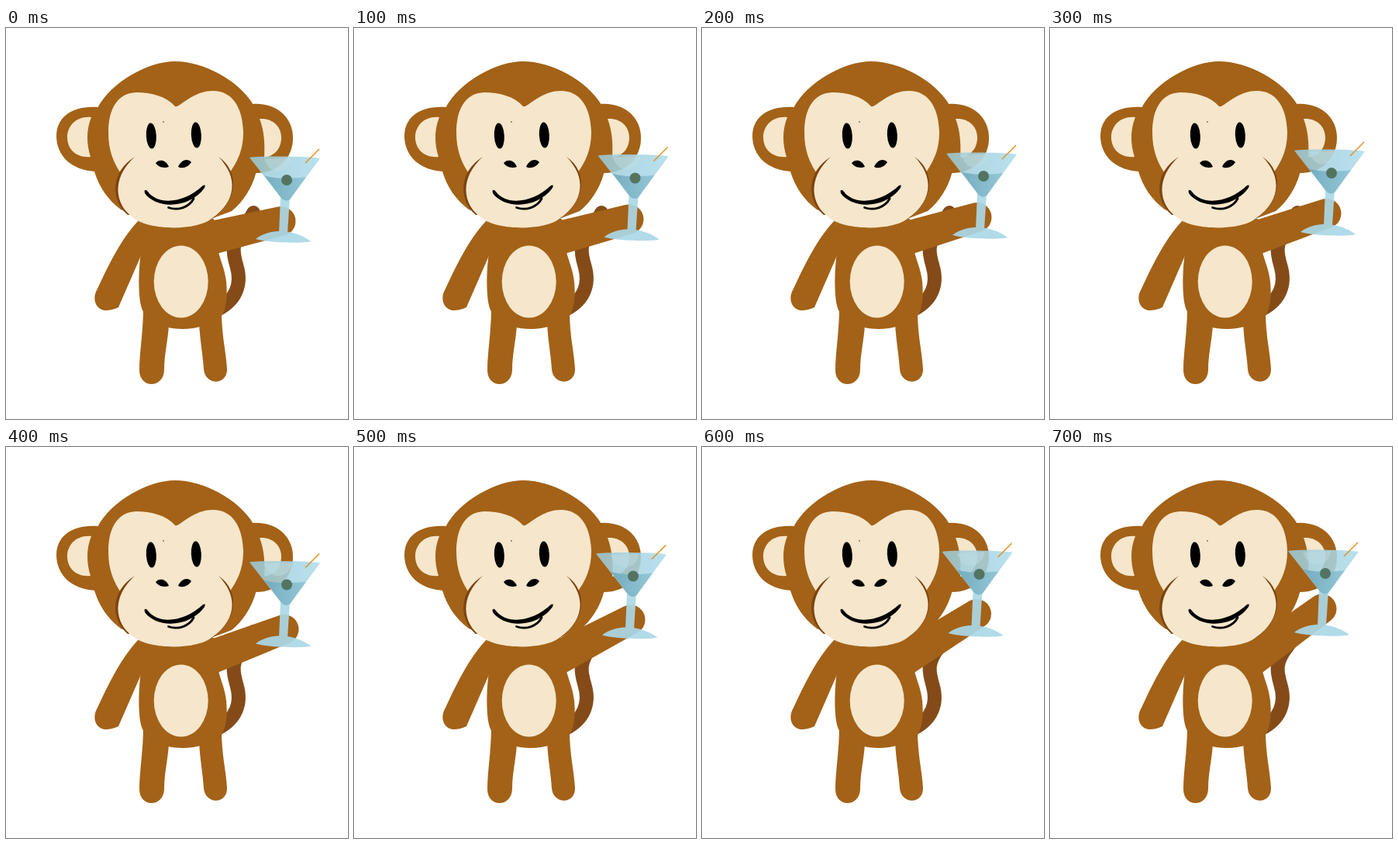
An HTML page that plays this animation: 441 px wide and 504 px high, repeating every 1.1 s.

```html
<!DOCTYPE html>
<html lang="en">
<head>
<meta charset="utf-8">
<title>Monkey raising a glass</title>
<style>
  html, body { margin: 0; width: 100%; height: 100%; overflow: hidden; background: #fff; }
  svg { display: block; width: 441px; height: 504px; }
  .fur { fill: #a36217; }
  .skin { fill: #f6e6cb; }
  .shade { fill: #7d4310; }
</style>
</head>
<body>
<svg viewBox="0 0 441 504">
  <defs>
    <linearGradient id="bowl">
      <stop offset="0" stop-color="#9ccbd9"/>
      <stop offset="1" stop-color="#aedbea"/>
    </linearGradient>
    <linearGradient id="drink">
      <stop offset="0" stop-color="#6faabd"/>
      <stop offset="1" stop-color="#8fc3d3"/>
    </linearGradient>
  </defs>

  <!-- tail -->
  <path d="M272.500 363C296 351 304.500 331 297.500 307C291.500 287 291.500 277 304 260C311 250 316 245 319 238"
        fill="none" stroke="#844b19" stroke-width="18" stroke-linecap="round"/>

  <!-- limbs and body -->
  <g class="fur">
    <path d="M172 247C152 268 138 293 118 336C110 349 116 363 128 364Q137 364 145 360L176 289Z"/>
    <path d="M177 360C177 392 172 418 172 441C172 465 203 465 204 441C204 420 209 402 210 382Z"/>
    <path d="M249 380C250 402 254 422 255 440C257 461 285 461 285 440C284 418 278 397 278 366Z"/>
    <path d="M172 248L174 290C171 310 171 330 172 344C173 360 177 368 183 373C196 384 212 388 228 388C246 388 262 383 278 371C286 358 285 338 284 327C282 310 276 299 274 288L268 246Z"/>
    <path id="arm"/>
  </g>
  <ellipse class="skin" cx="225.700" cy="327" rx="35" ry="46.500"/>

  <!-- ears -->
  <g class="fur">
    <path d="M118 102C84 100 65 116 65 139C65 165 85 184 116 185Z"/>
    <path d="M318 98C350 96 370 116 370 142C370 168 350 188 320 187Z"/>
  </g>
  <g class="skin">
    <path d="M110 115C91 113 79 126 79 141C79 157 92 168 109 166C104 150 103 132 110 115Z"/>
    <path d="M327 117C344 116 355 127 355 141C355 156 346 165 333 167C334 149 333 133 327 117Z"/>
  </g>

  <!-- head -->
  <path class="fur" d="M218 43C184 43 136 69 118 103C106 127 105 159 114 185C120 205 131 221 148 234L175 245L262 247L291 236C306 224 317 206 322 188C331 160 332 126 319 99C300 67 254 43 218 43Z"/>
  <path class="skin" d="M218 101C207 88 187 83 168 83C143 84 132 105 132 135C132 157 138 174 150 190L286 190C299 172 306 157 306 134C305 101 291 81 267 81C246 81 231 95 224 99Q220 102 218 101Z"/>
  <path class="shade" d="M166 166C134 186 135 222 157 241L164 240C142 220 140 190 166 166Z"/>
  <path class="shade" d="M274 166C303 186 299 226 261 249L263 246C292 223 298 190 274 166Z"/>
  <path class="skin" d="M166 167C136 192 139 228 165 245C184 261 247 262 266 245C297 224 300 191 274 167Z"/>

  <!-- features -->
  <ellipse cx="187.300" cy="139" rx="6.500" ry="16.500" transform="rotate(-3 187.300 139)"/>
  <ellipse cx="245.300" cy="138" rx="6.500" ry="16.500" transform="rotate(-3 245.300 138)"/>
  <path d="M193 174C197 169 206 169 210 179C204 181 197 180 193 174Z"/>
  <path d="M239 173C235 168 226 169 222 179C228 182 235 179 239 173Z"/>
  <path d="M178.500 210Q180 207 183 211C196 229 230 226 254 203Q258 201 256 206C237 233 194 234 179 213Z"/>
  <path d="M209.500 231.500C222 236 236 231 242 220" fill="none" stroke="#000" stroke-width="2.800" stroke-linecap="round"/>
  <circle cx="203" cy="121" r=".7"/>

  <!-- glass -->
  <g id="glass">
    <g fill="#abd8e7" opacity=".92">
      <path d="M354 218L366 218L363 264L352 264Z"/>
      <path d="M322 272C330 265 346 261 358 262C373 263 387 270 393 275C384 278 337 277 322 272Z"/>
    </g>
    <path d="M314 167C329 165 386 165 405 168L366 221Q360 225 354 218Z" fill="url(#bowl)" opacity=".86"/>
    <path d="M333 190C346 195 371 194 387 192L366 221Q360 225 354 218Z" fill="url(#drink)" opacity=".9"/>
    <path d="M333 169C339 184 349 189 362 181Q368 176 369 167Z" fill="#c2dcdf" opacity=".45"/>
    <circle cx="362" cy="196" r="7" fill="#527463"/>
    <circle cx="363" cy="195.500" r="1.300" fill="#7a6446"/>
    <path d="M386 174L404 156" stroke="#e0952c" stroke-width="1.600"/>
  </g>
</svg>
<script>
  const STEP = 100, LOOP = 1100;
  // hand x, hand y, glass shift x, glass shift y
  const poses = [
    [354.5, 249, 0, 0],
    [354.5, 246.5, 0.5, -2.5],
    [354.5, 244, 1, -5],
    [356.5, 239, 1, -9],
    [358.5, 235, 0, -18.5],
    [356.5, 222.5, -2, -29.5],
    [354, 215, -4.5, -32],
    [350.5, 208.5, -7, -33]
  ];
  const arm = document.getElementById("arm");
  const glass = document.getElementById("glass");
  const R = 19;
  let shown = -1;

  function armPath(x, y) {
    const a = Math.atan2(y - 269, x - 268);
    const nx = Math.sin(a) * R, ny = -Math.cos(a) * R;
    return `M258 250L${x + nx} ${y + ny}A${R} ${R} 0 0 1 ${x - nx} ${y - ny}L275 290L250 290Z`;
  }

  function draw(now) {
    const i = Math.min(poses.length - 1, Math.floor((now % LOOP) / STEP));
    if (i !== shown) {
      const [x, y, dx, dy] = poses[i];
      arm.setAttribute("d", armPath(x, y));
      glass.setAttribute("transform", `translate(${dx} ${dy})`);
      shown = i;
    }
  }

  const start = performance.now();
  function tick() {
    draw(performance.now() - start);
    requestAnimationFrame(tick);
  }
  tick();
</script>
</body>
</html>
```
